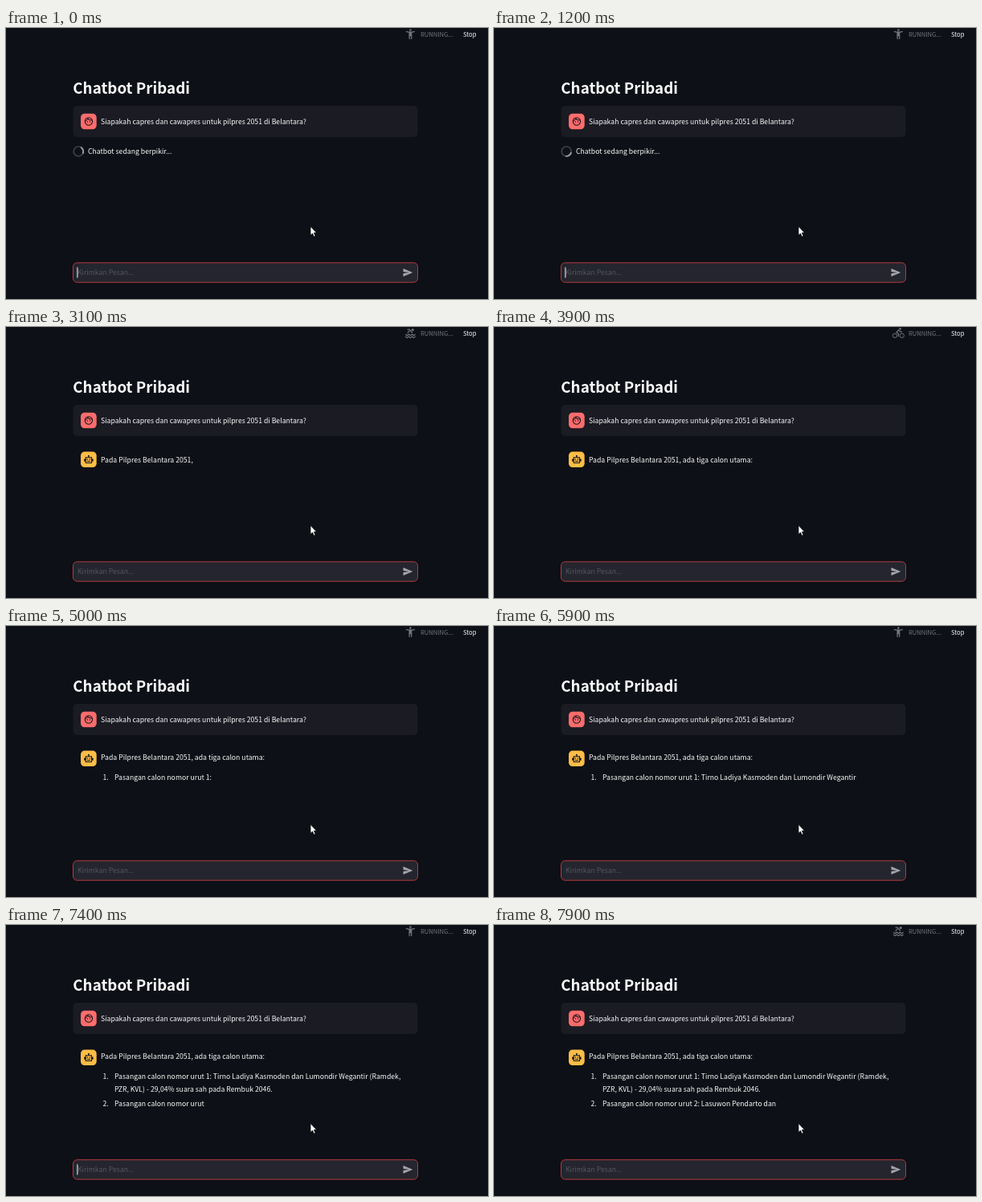
An HTML page with a canvas that plays this animation: 600x338 px, repeating every 8 s.

```html
<!DOCTYPE html>
<html lang="id">
<head>
<meta charset="utf-8">
<title>Chatbot Pribadi</title>
<style>
  html, body { margin: 0; width: 100%; height: 100%; overflow: hidden; background: #0d1016; }
  canvas { display: block; width: 600px; height: 338px; }
</style>
</head>
<body>
<canvas id="stage"></canvas>
<script>
const W = 600, H = 338, LOOP = 8000;
const FONT = '"Noto Sans CJK JP", "Noto Sans CJK SC", "Noto Sans CJK", "Open Sans", sans-serif';
const BODY = 8.7, SMALL = 7.63;
const BG = '#0d1016', INK = '#fafafa', MUTED = '#74767d', DARK = '#15161c';

const canvas = document.getElementById('stage');
const ctx = canvas.getContext('2d');
const dpr = window.devicePixelRatio || 1;
canvas.width = W * dpr;
canvas.height = H * dpr;

// Each line streams in word by word: start time and ms per word.
const answer = [
  { x: 118, y: 167, start: 2450, step: 180, text: 'Pada Pilpres Belantara 2051, ada tiga calon utama:' },
  { x: 135, y: 192.3, start: 4250, step: 165, mark: '1.',
    text: 'Pasangan calon nomor urut 1: Tirno Ladiya Kasmoden dan Lumondir Wegantir (Ramdek,' },
  { x: 135, y: 207.8, start: 6130, step: 75, text: 'PZR, KVL) - 29,04% suara sah pada Rembuk 2046.' },
  { x: 135, y: 225.6, start: 6950, step: 125, mark: '2.',
    text: 'Pasangan calon nomor urut 2: Lasuwon Pendarto dan' }
];
const ANSWER_START = answer[0].start, LIST_START = answer[1].start;
const THINKING_END = 2100;

function label(str, x, y, size = BODY, color = INK, weight = 400) {
  ctx.font = `${weight} ${size}px ${FONT}`;
  ctx.fillStyle = color;
  ctx.fillText(str, x, y);
}

function box(x, y, w, h, r, fill, stroke) {
  ctx.beginPath();
  ctx.roundRect(x, y, w, h, r);
  ctx.fillStyle = fill;
  ctx.fill();
  if (stroke) {
    ctx.strokeStyle = stroke;
    ctx.lineWidth = 1;
    ctx.stroke();
  }
}

function dot(x, y, r) {
  ctx.beginPath();
  ctx.arc(x, y, r, 0, Math.PI * 2);
  ctx.fill();
}

function arc(x, y, r, from = 0, to = Math.PI * 2) {
  ctx.beginPath();
  ctx.arc(x, y, r, from, to);
  ctx.stroke();
}

function trace(points, close) {
  ctx.beginPath();
  for (let i = 0; i < points.length; i += 2) ctx.lineTo(points[i], points[i + 1]);
  if (close) ctx.closePath();
}

function limb(...points) {
  trace(points);
  ctx.stroke();
}

// Draws on a 24-unit grid centred on (x, y).
function icon(x, y, scale, color, draw) {
  ctx.save();
  ctx.translate(x, y);
  ctx.scale(scale, scale);
  ctx.translate(-12, -12);
  ctx.fillStyle = ctx.strokeStyle = color;
  ctx.lineWidth = 2;
  draw();
  ctx.restore();
}

function standing() {
  dot(12, 4, 2);
  limb(3.2, 7, 8, 7.9, 16, 7.9, 20.8, 7);
  ctx.fillRect(9, 7.5, 6, 8.5);
  ctx.fillRect(9, 15, 2, 7);
  ctx.fillRect(13, 15, 2, 7);
}

function cycling() {
  dot(15.5, 3.5, 2);
  ctx.lineWidth = 1.5;
  arc(5, 17, 4.2);
  arc(19, 17, 4.2);
  ctx.lineWidth = 2;
  limb(12, 19, 12, 13.4, 8.3, 9.8, 12.4, 6, 15, 8.5, 19.1, 10);
}

function swimming() {
  dot(16.5, 5.5, 2.5);
  limb(6, 5, 10, 5, 16, 11.5);
  limb(10.6, 7.3, 6, 12);
  for (const y of [15.5, 20]) {
    ctx.beginPath();
    for (let x = 2; x <= 22; x += 0.5) ctx.lineTo(x, y - Math.cos((x - 2) * Math.PI / 3.33));
    ctx.stroke();
  }
}

function running() {
  dot(13.5, 3.5, 2);
  limb(7, 13, 7, 8.9, 12, 6.8, 14.3, 9.8, 19, 12);
  ctx.lineWidth = 2.8;
  limb(11.8, 7.4, 10.3, 14.2);
  ctx.lineWidth = 2;
  limb(10.3, 13.4, 9, 20.3, 3.2, 19);
  limb(10.4, 13, 14, 16.2, 14, 23);
}

function face() {
  arc(12, 12, 9);
  dot(9, 13, 1.4);
  dot(15, 13, 1.4);
  ctx.beginPath();
  ctx.moveTo(3.5, 11.5);
  ctx.quadraticCurveTo(8, 10, 10, 5);
  ctx.quadraticCurveTo(13, 10, 20.5, 9);
  ctx.stroke();
}

function robot() {
  ctx.strokeRect(5, 7, 14, 13);
  ctx.fillRect(1, 10.5, 3.5, 6);
  ctx.fillRect(19.5, 10.5, 3.5, 6);
  limb(12, 7, 12, 3);
  dot(12, 3.3, 1.8);
  dot(9, 11.5, 1.6);
  dot(15, 11.5, 1.6);
  limb(8, 16, 16, 16);
}

function activity(t) {
  const p = t % 1200;
  if (p < 300 || p >= 1100) return standing;
  if (p < 500) return cycling;
  return p < 900 ? swimming : running;
}

function avatar(y, fill, draw) {
  box(93, y - 9.7, 19.7, 19.5, 4.8, fill);
  icon(102.9, y, 0.52, DARK, draw);
}

function spinner(t) {
  const mid = -0.3 + t / 1000 * Math.PI * 2;
  ctx.lineWidth = 1.9;
  ctx.strokeStyle = '#3a3c44';
  arc(90.2, 153.9, 6);
  ctx.strokeStyle = '#9a9ca3';
  arc(90.2, 153.9, 6, mid - Math.PI / 4, mid + Math.PI / 4);
  label('Chatbot sedang berpikir...', 102, 157.2);
}

function reply(t) {
  avatar(165.3, '#ffbd45', robot);
  // A lone paragraph sits centred on the avatar.
  const drop = t < LIST_START ? 2 : 0;
  for (const { x, y, start, step, text, mark } of answer) {
    if (t < start) continue;
    const count = 1 + Math.floor((t - start) / step);
    if (mark) label(mark, 120.5, y);
    label(text.split(' ').slice(0, count).join(' '), x, y + drop);
  }
}

function inputBar(t) {
  box(83.5, 292.8, 429, 24.4, 5, '#24252e', '#b23b40');
  label('Kirimkan Pesan...', 89, 308.2, BODY, '#555760');
  if ((t + 70) % 1060 < 530) {
    ctx.fillStyle = INK;
    ctx.fillRect(88.4, 298.5, 1, 13);
  }
  ctx.fillStyle = '#a5a6ab';
  trace([494.5, 300, 506.3, 305, 494.5, 310, 494.5, 306.1, 502, 305, 494.5, 303.9], true);
  ctx.fill();
}

function pointer() {
  trace([379, 247.5, 379, 258.6, 381.5, 256.3, 383.3, 260.2, 385.1, 259.4, 383.4, 255.6, 386.6, 255.4], true);
  ctx.fillStyle = '#fff';
  ctx.strokeStyle = '#000';
  ctx.lineWidth = 0.7;
  ctx.fill();
  ctx.stroke();
}

function draw(t) {
  ctx.setTransform(dpr, 0, 0, dpr, 0, 0);
  ctx.fillStyle = BG;
  ctx.fillRect(0, 0, W, H);

  icon(503.4, 7.6, 0.63, MUTED, activity(t));
  label('RUNNING...', 516, 10.8, SMALL, MUTED);
  label('Stop', 569, 10.8, SMALL);

  label('Chatbot Pribadi', 83.3, 82, 18.8, INK, 600);
  box(83.5, 97, 429, 39, 5, '#1a1b23');
  avatar(116.5, '#ff6c6c', face);
  label('Siapakah capres dan cawapres untuk pilpres 2051 di Belantara?', 118, 120);

  if (t < THINKING_END) spinner(t);
  if (t >= ANSWER_START) reply(t);
  inputBar(t);
  pointer();
}

const origin = performance.now();
function tick() {
  draw((performance.now() - origin) % LOOP);
  requestAnimationFrame(tick);
}
tick();
</script>
</body>
</html>
```
